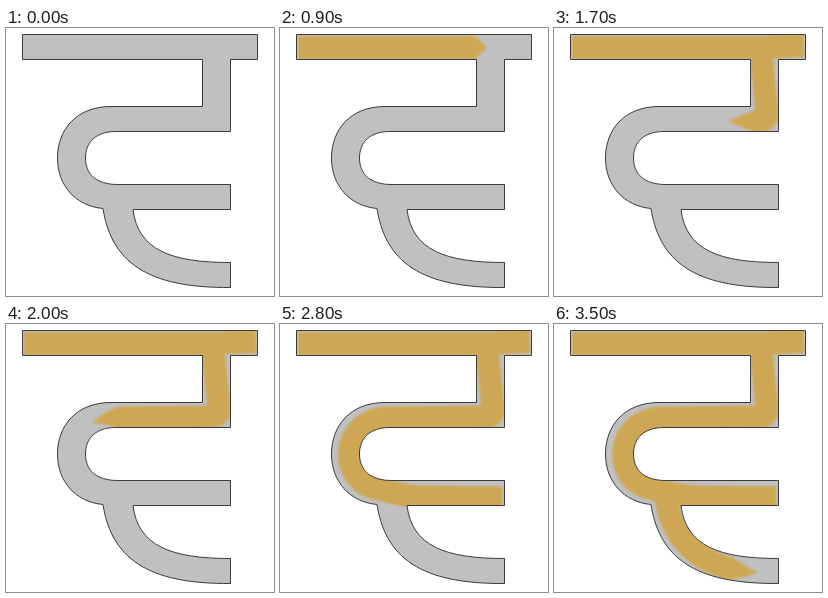
An HTML page with a canvas for the animation above (3.6 s loop, 268 px wide and 268 px high).

```html
<!DOCTYPE html>
<html lang="en">
<head>
<meta charset="utf-8">
<title>Letter stroke order</title>
<style>
html, body { margin: 0; width: 100%; height: 100%; overflow: hidden; background: #fff; }
canvas { display: block; width: 268px; height: 268px; }
</style>
</head>
<body>
<canvas id="stage" width="268" height="268"></canvas>
<script>
const ctx = document.getElementById('stage').getContext('2d');
const LOOP = 3600, STEP = 100;

const letter = new Path2D(
  'M16.5 6.5H251.5V31.5H224.5V103.5H110' +
  'C90 103.5 79.5 114 79.5 130S90 156.5 112 156.5' +
  'H224.5V181.5H127C132 222 165 234.5 224.5 234.5V259.5' +
  'C150 260 106 240 97 180.5C70 178 51.5 158 51.5 130' +
  'S70 78.5 105 78.5H196.5V31.5H16.5Z');

// start in ms, speed in px per ms, taper length in px
const strokes = [
  makeStroke('M18 19.5H205L250 17.5', 0, .21, 12),
  makeStroke('M207 24L213 86Q213 93 204 93L110 94C58 94 58 160 100 165Q125 173 150 173L223 174',
    1340, .294, 28),
  makeStroke('M112 172C116 215 148 247 206 248.5', 3100, .33, 28)
];

function makeStroke(d, start, speed, taper) {
  const path = document.createElementNS('http://www.w3.org/2000/svg', 'path');
  path.setAttribute('d', d);
  const len = path.getTotalLength();
  const points = [];
  for (let i = 0; i <= len; i++) {
    const p = path.getPointAtLength(i);
    const a = path.getPointAtLength(Math.max(0, i - 1));
    const b = path.getPointAtLength(Math.min(len, i + 1));
    const n = Math.hypot(b.x - a.x, b.y - a.y);
    points.push({ x: p.x, y: p.y, nx: (a.y - b.y) / n, ny: (b.x - a.x) / n });
  }
  return { points, start, speed, taper };
}

function paint({ points, start, speed, taper }, t) {
  const tip = (t - start) * speed;
  if (tip <= 0) return;
  const left = [], right = [];
  points.slice(0, Math.ceil(tip)).forEach((p, i) => {
    const w = 11.5 * Math.min(1, (tip - i) / taper);
    left.push([p.x - p.nx * w, p.y - p.ny * w]);
    right.push([p.x + p.nx * w, p.y + p.ny * w]);
  });
  ctx.beginPath();
  left.concat(right.reverse()).forEach(q => ctx.lineTo(...q));
  ctx.fill();
}

function draw(t) {
  ctx.fillStyle = '#fff';
  ctx.fillRect(0, 0, 268, 268);
  ctx.fillStyle = '#c0c0c0';
  ctx.fill(letter);
  ctx.save();
  ctx.clip(letter);
  ctx.filter = 'blur(1.3px)';
  ctx.fillStyle = '#cea754';
  strokes.forEach(s => paint(s, t));
  ctx.restore();
  ctx.strokeStyle = '#2a2a2a';
  ctx.lineWidth = .9;
  ctx.lineJoin = 'round';
  ctx.stroke(letter);
}

const begin = performance.now();
function tick() {
  const t = (performance.now() - begin) % LOOP;
  draw(Math.floor(t / STEP) * STEP);
  requestAnimationFrame(tick);
}
tick();
</script>
</body>
</html>
```
